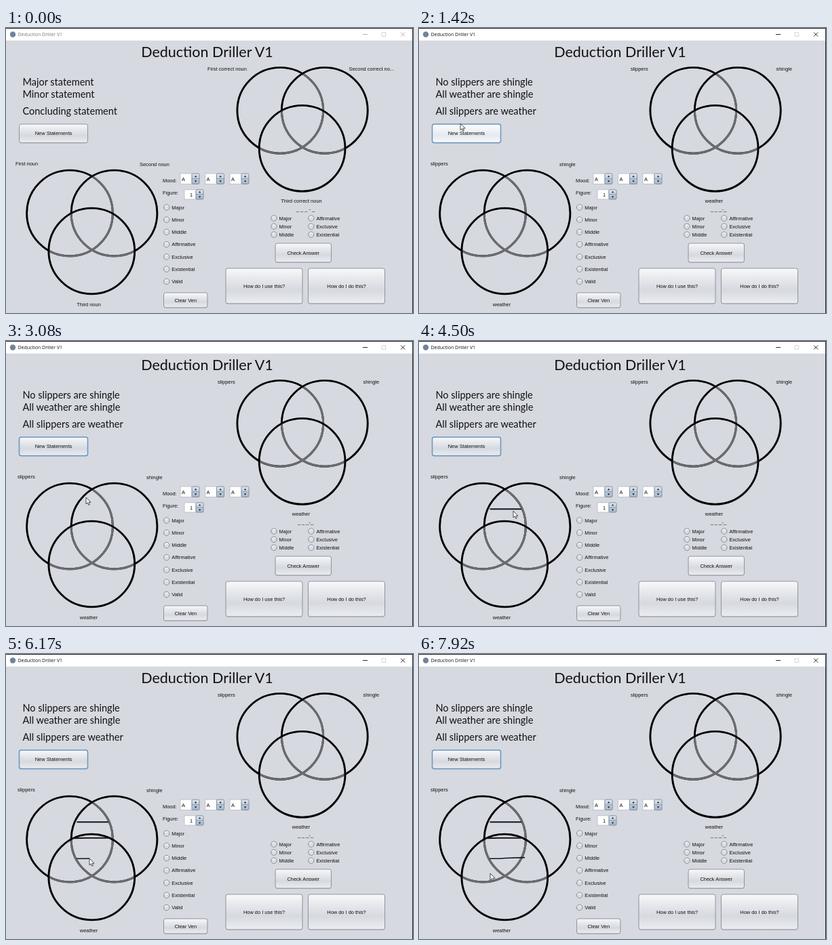
These frames come from a looping animation (600 by 421 pixels, 8 s). An HTML page:

```html
<!DOCTYPE html>
<html lang="en">
<head>
<meta charset="utf-8">
<title>Deduction Driller V1</title>
<style>
  html, body { margin: 0; width: 100%; height: 100%; overflow: hidden; background: #d6d9df; }
  svg { display: block; width: 100vw; height: 100vh; }
  text { font: 7.45px "Liberation Sans", Arial, sans-serif; fill: #111; white-space: pre; font-variant-ligatures: none; }
  .caption { font: 7px "Open Sans", sans-serif; }
  .title { font: 21.5px Lato, sans-serif; }
  .statement { font: 14.5px Lato, sans-serif; }
</style>
</head>
<body>
<svg id="stage" viewBox="0 0 600 421" preserveAspectRatio="none">
  <defs>
    <linearGradient id="face" x2="0" y2="1">
      <stop offset="0" stop-color="#f8f9fa"/>
      <stop offset=".3" stop-color="#e6e8ec"/>
      <stop offset=".62" stop-color="#d6d9df"/>
      <stop offset="1" stop-color="#ebedf1"/>
    </linearGradient>
    <linearGradient id="hover" x2="0" y2="1">
      <stop offset="0" stop-color="#fdfdfe"/>
      <stop offset=".3" stop-color="#f2f3f6"/>
      <stop offset=".62" stop-color="#e6e9ee"/>
      <stop offset="1" stop-color="#fafbfd"/>
    </linearGradient>
    <linearGradient id="pressed" x2="0" y2="1">
      <stop offset="0" stop-color="#8f99a8"/>
      <stop offset="1" stop-color="#b9c1cc"/>
    </linearGradient>
    <linearGradient id="step" x2="0" y2="1">
      <stop offset="0" stop-color="#dfe6ee"/>
      <stop offset="1" stop-color="#a3b5ca"/>
    </linearGradient>
  </defs>
</svg>
<script>
const stage = document.getElementById('stage');
const STEPS = 96, STEP_MS = 8000 / STEPS, LOOP_MS = 8000;
const PRESS = 15, REVEAL = 16;

function add(tag, attrs, parent = stage) {
  const el = document.createElementNS('http://www.w3.org/2000/svg', tag);
  for (const key in attrs) el.setAttribute(key, attrs[key]);
  return parent.appendChild(el);
}

function label(x, y, content, attrs = {}) {
  const el = add('text', { x, y, ...attrs });
  el.textContent = content;
  return el;
}

const centred = { 'text-anchor': 'middle' };

function button(x, y, width, height, content) {
  add('rect', { x, y: y + 1, width, height, rx: 3, fill: '#b9bdc5' });
  const face = add('rect', { x, y, width, height, rx: 3, fill: 'url(#face)', stroke: '#878b94', 'stroke-width': .9 });
  label(x + width / 2, y + height / 2 + 2.5, content, centred);
  return face;
}

function radio(x, y, content) {
  add('circle', { cx: x, cy: y, r: 4.2, fill: 'url(#face)', stroke: '#7d828b', 'stroke-width': .9 });
  label(x + 7.6, y + 2.6, content);
}

function spinner(x, y, height, content, textX) {
  const mid = y + height / 2;
  add('rect', { x, y, width: 17, height, fill: '#fff', stroke: '#b5b9c1', 'stroke-width': .8 });
  add('rect', { x: x + 17, y, width: 11, height, rx: 1.5, fill: 'url(#step)', stroke: '#6f8299', 'stroke-width': .8 });
  add('path', { d: `M${x + 17} ${mid}h11`, stroke: '#6f8299', 'stroke-width': .7 });
  add('path', { d: `M${x + 20.8} ${mid - 2.6}h3.6l-1.8-2.4zM${x + 20.8} ${mid + 2.6}h3.6l-1.8 2.4z`, fill: '#222' });
  label(textX, mid + 2.8, content);
}

// Three rings; each later ring dims the outlines that fall inside it.
function venn(id, x, y) {
  const rings = [[x, y], [x + 65.5, y], [x + 32.3, y + 56]];
  const outline = ([cx, cy], stroke, clip) => add('circle', {
    cx, cy, r: 63.4, fill: 'none', stroke, 'stroke-width': clip ? 3 : 2.9,
    ...(clip && { 'clip-path': `url(#${clip})` })
  });
  rings.forEach((ring, i) => {
    const clip = id + i;
    add('circle', { cx: ring[0], cy: ring[1], r: 63.4 }, add('clipPath', { id: clip }));
    rings.slice(0, i).forEach(under => outline(under, '#6b6c70', clip));
    outline(ring, '#000');
  });
}

// Window frame
add('rect', { width: 600, height: 421, fill: '#d6d9df' });
add('rect', { width: 600, height: 18.5, fill: '#fff' });
add('circle', { cx: 10, cy: 9.5, r: 4.2, fill: '#71839a' });
const caption = label(17.5, 12.3, 'Deduction Driller V1', { class: 'caption' });
const controls = add('path', { d: 'M526 9.5h7M582 6.5l6 6M588 6.5l-6 6', fill: 'none', 'stroke-width': .9 });
add('rect', { x: 554, y: 6.8, width: 5.8, height: 5.4, fill: 'none', stroke: '#c9c9c9', 'stroke-width': .8 });
add('path', { d: 'M0 .5H599.5V421', fill: 'none', stroke: '#222', 'stroke-width': 1 });

label(296.5, 43, 'Deduction Driller V1', { class: 'title', ...centred });

// Each entry: before and after the click, as [x, y, text, attributes].
const statement = { class: 'statement' };
const changing = [
  [[24.5, 85, 'Major statement', statement], [24.5, 85, 'No slippers are shingle', statement]],
  [[24.5, 103, 'Minor statement', statement], [24.5, 103, 'All weather are shingle', statement]],
  [[24.5, 127.5, 'Concluding statement', statement], [24.5, 127.5, 'All slippers are weather', statement]],
  [[297, 63.3, 'First correct noun'], [312, 63.3, 'slippers']],
  [[505.5, 63.3, 'Second correct no...'], [526.5, 63.3, 'shingle']],
  [[435.5, 257.7, 'Third correct noun', centred], [435, 257.7, 'weather', centred]],
  [[14, 203.3, 'First noun'], [17, 203.3, 'slippers']],
  [[197, 204.2, 'Second noun'], [207, 204.2, 'shingle']],
  [[122, 411.3, 'Third noun', centred], [122, 411.3, 'weather', centred]],
  [[441.5, 269.7, '_ _ _ - _', centred], [441.5, 270.2, '_ _ _-_', centred]]
].map(pair => pair.map(args => label(...args)));

const newButton = button(19.5, 142, 101, 27.5, 'New Statements');
button(232.5, 391, 64.5, 22, 'Clear Ven');
button(397, 318, 82.5, 28, 'Check Answer');
button(324, 355, 113, 52, 'How do I use this?');
button(445.5, 355, 113, 52, 'How do I do this?');

label(231, 227.5, 'Mood:');
[257, 293.5, 330].forEach(x => spinner(x, 215, 15.5, 'A', x + 2));
label(231, 246, 'Figure:');
spinner(263, 238.8, 14.2, '1', 271);

['Major', 'Minor', 'Middle', 'Affirmative', 'Exclusive', 'Existential', 'Valid']
  .forEach((name, i) => radio(236.7, 265 + i * 18.25, name));
['Major', 'Minor', 'Middle'].forEach((name, i) => radio(395, 281 + i * 12.1, name));
['Affirmative', 'Exclusive', 'Existential'].forEach((name, i) => radio(449.8, 281 + i * 12.1, name));

venn('answer', 404.3, 121.8);
venn('work', 94, 273.5);

// Strokes drawn by the pointer between two steps
const strokes = [
  { from: 46, to: 51, x0: 104.5, x1: 151, d: 'M104.5 248.3H151', width: 2 },
  { from: 62, to: 66, x0: 99, x1: 155, d: 'M99 272.2L118 271.7H155', width: 1.9 },
  { from: 73, to: 77, x0: 104, x1: 156, d: 'M104 302.3H119L128 301.5L156 300.6', width: 1.6 }
].map(s => ({
  ...s,
  el: add('path', { d: s.d, pathLength: 1, fill: 'none', stroke: '#14151c', 'stroke-width': s.width })
}));

const pointer = add('path', {
  d: 'M0 0V9.8L2.2 7.8L3.8 11.3L5.4 10.6L3.9 7.2H7Z',
  fill: '#fff', stroke: '#222', 'stroke-width': .8, 'stroke-linejoin': 'round'
});

// Pointer path: [step, x, y]
const route = [
  [0, 606, 374], [3, 520, 330], [10, 78, 150], [12, 61, 141], [20, 61, 141],
  [23, 66, 128], [25, 66, 128], [35, 116, 206], [37, 118, 231], [40, 186, 268],
  [42, 152, 299], [45, 104, 248], [46, 104, 248], [51, 151, 248], [54, 139, 251],
  [55, 134, 263], [59, 126, 327], [62, 98, 272], [66, 153, 272], [67, 153, 272],
  [71, 103, 302], [73, 104, 302], [74, 123, 302], [77, 155, 301], [78, 155, 301],
  [82, 92, 350], [83, 92, 350], [85, 147, 342], [87, 89, 335], [88, 89, 335],
  [89, 88, 333], [90, 88, 333], [93, 152, 306], [95, 105, 324], [96, 105, 324]
];

function pointerAt(step) {
  const i = route.findIndex(key => key[0] > step);
  const [s0, x0, y0] = route[i - 1], [s1, x1, y1] = route[i];
  const u = (step - s0) / (s1 - s0);
  const ease = u * u * (3 - 2 * u);
  return [x0 + (x1 - x0) * ease, y0 + (y1 - y0) * ease];
}

function show(el, on) {
  el.setAttribute('visibility', on ? 'visible' : 'hidden');
}

function render(ms) {
  const step = Math.min(STEPS - 1, Math.floor((ms % LOOP_MS + 5) / STEP_MS));
  const active = step >= PRESS, down = step >= PRESS && step < REVEAL;
  const [x, y] = pointerAt(step);
  const over = x > 19 && x < 121 && y > 140 && y < 170;

  pointer.setAttribute('transform', `translate(${x} ${y})`);
  caption.style.fill = active ? '#111' : '#777';
  controls.setAttribute('stroke', active ? '#111' : '#aaa');
  newButton.setAttribute('fill', `url(#${down ? 'pressed' : over ? 'hover' : 'face'})`);
  newButton.setAttribute('stroke', active ? '#6795c0' : '#878b94');
  newButton.setAttribute('stroke-width', active ? 1.5 : .9);

  for (const [before, after] of changing) {
    show(before, step < REVEAL);
    show(after, step >= REVEAL);
  }
  for (const s of strokes) {
    const part = step >= s.to ? 1 : step < s.from ? 0 : Math.min(1, Math.max(0, (x - s.x0) / (s.x1 - s.x0)));
    show(s.el, part > 0);
    s.el.setAttribute('stroke-dasharray', `${part} 2`);
  }
}

function tick() {
  render(performance.now());
  requestAnimationFrame(tick);
}
tick();
</script>
</body>
</html>
```
